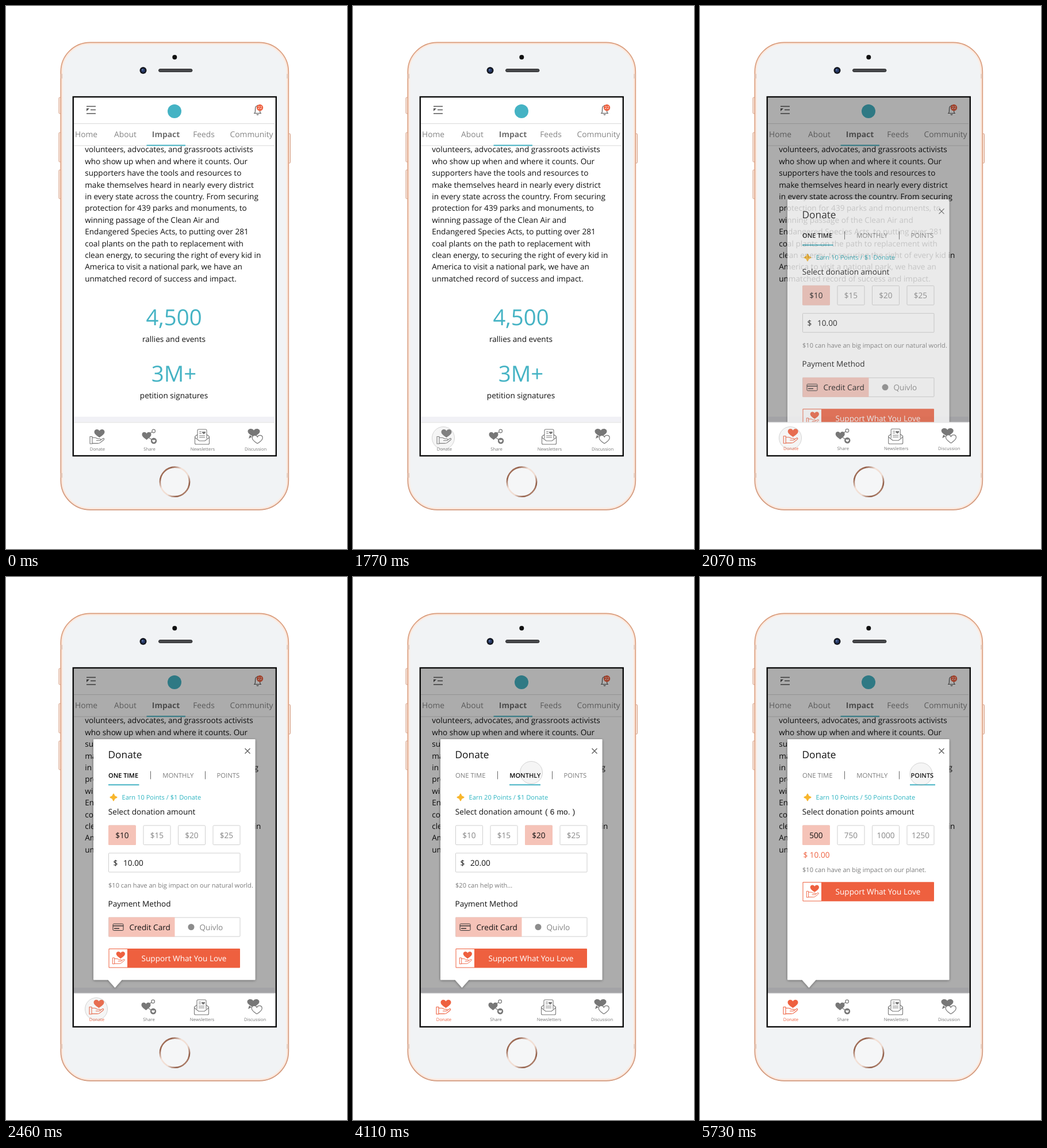
Animation of 593x944 px, one loop 5.76 s. Source, as an HTML page:

```html
<!DOCTYPE html>
<html lang="en">
<head>
<meta charset="utf-8">
<title>Donation app</title>
<style>
  html, body { margin: 0; width: 100%; height: 100%; overflow: hidden; background: #fff; }
  svg { display: block; width: 593px; height: 944px; font-family: "Open Sans", "Noto Sans", sans-serif; font-size: 13.6px; text-rendering: geometricPrecision; }
</style>
</head>
<body>
<svg id="stage" viewBox="0 0 593 944" xmlns="http://www.w3.org/2000/svg"></svg>
<script>
const LOOP = 5760, DURATION = 300;
const TEAL = '#45b3c4', ORANGE = '#ee603f', PINK = '#f5c3b8', GREY = '#7b7b7b', LINE = '#cfcfcf';
const OPEN = 1900, MONTHLY = 3400, POINTS = 4900;

const text = (x, y, str, attrs = '') => `<text x="${x}" y="${y}" ${attrs}>${str}</text>`;
const mid = (x, y, str, attrs = '') => text(x, y, str, `text-anchor="middle" ${attrs}`);
const rect = (x, y, w, h, attrs = '') => `<rect x="${x}" y="${y}" width="${w}" height="${h}" ${attrs}/>`;
const circle = (x, y, r, attrs = '') => `<circle cx="${x}" cy="${y}" r="${r}" ${attrs}/>`;
const path = (d, attrs = '') => `<path d="${d}" ${attrs}/>`;
const outline = (color, width = 1) => `fill="none" stroke="${color}" stroke-width="${width}"`;
const heart = (x, y, w, h, attrs = '') =>
  `<use href="#heart" transform="translate(${x} ${y}) scale(${w} ${h})" ${attrs}/>`;

const lerp = (a, b, p) => a + (b - a) * p;
const clamp = v => Math.min(1, Math.max(0, v));

// cubic-bezier(0, 0, .58, 1)
function easeOut(x) {
  let lo = 0, hi = 1;
  for (let i = 0; i < 24; i++) {
    const u = (lo + hi) / 2;
    if (u * u * (1.74 - 0.74 * u) < x) lo = u; else hi = u;
  }
  return lo * lo * (3 - 2 * lo);
}
const progress = (t, start) => easeOut(clamp((t - start) / DURATION));

const defs = `<defs>
  <linearGradient id="gold" x1="0" y1="0" x2="0" y2="1">
    <stop offset="0" stop-color="#d99c7c"/><stop offset=".5" stop-color="#dfa68a"/><stop offset="1" stop-color="#d2997d"/>
  </linearGradient>
  <linearGradient id="ring" x1="0" y1="0" x2="1" y2="1">
    <stop offset="0" stop-color="#c99a83"/><stop offset=".2" stop-color="#94604a"/><stop offset=".38" stop-color="#f4e2d9"/>
    <stop offset=".6" stop-color="#f0dcd1"/><stop offset=".78" stop-color="#8f5b45"/><stop offset="1" stop-color="#e2bfae"/>
  </linearGradient>
  <filter id="shadow" x="-10%" y="-10%" width="120%" height="120%">
    <feDropShadow dx="0" dy="1" stdDeviation="2" flood-color="#000" flood-opacity=".4"/>
  </filter>
  <clipPath id="page">${rect(117, 243.5, 352, 480)}</clipPath>
  <clipPath id="above">${rect(117, 158, 352, 566)}</clipPath>
  <path id="heart" vector-effect="non-scaling-stroke" d="M0 .95C-.35 .65-1 .2-1-.35C-1-.75-.76-.95-.5-.95C-.25-.95-.08-.8 0-.58C.08-.8 .25-.95 .5-.95C.76-.95 1-.75 1-.35C1 .2 .35 .65 0 .95Z"/>
  <g id="give">
    ${heart(4.5, -5.5, 9, 7.5, 'fill="currentColor"')}
    ${path('M-12 0h4v12.5h-4zM-8 2h5c2.5 0 3 2 5.5 2h2.5c2.2 0 2.2 3 0 3h-6M6.5 6l4-2.5c2-1 3 .8 1.5 2.2l-6.5 5.2c-1 .8-2 1-4 1h-9.5',
      'fill="none" stroke="currentColor" stroke-width="1.1" stroke-linejoin="round"')}
  </g>
</defs>`;

function phone() {
  const button = (x, y, h) => rect(x, y, 4, h, 'rx="1.3" fill="#fbeae0" stroke="#d39c82" stroke-width="1"');
  const bands = [[95.5, 118], [95.5, 812], [486.5, 118], [486.5, 812]]
    .map(([x, y]) => rect(x, y, 4.5, 8, 'fill="#e6cabb"')).join('');
  return button(92, 159, 28) + button(92, 220, 51) + button(92, 285, 50) + button(490.5, 222, 51)
    + rect(95.3, 63.3, 396, 812.5, 'rx="51" fill="#fbe6da" stroke="url(#gold)" stroke-width="1.7"')
    + bands
    + rect(99, 67, 388.5, 805, 'rx="47" fill="#f1f3f5" stroke="#f6f1ee" stroke-width="1.5"')
    + circle(293.3, 89, 4, 'fill="#111"')
    + circle(238.5, 112, 6, 'fill="#14171f"') + circle(238.5, 112, 3.4, 'fill="#273a68"') + circle(237.5, 111, 1.2, 'fill="#6d84b5"')
    + rect(265.5, 109.5, 58.5, 5, 'rx="2.5" fill="#47484b" stroke="#2e2e30" stroke-width="1"')
    + circle(293.5, 827.2, 25.6, 'fill="#f5f6f7" stroke="url(#ring)" stroke-width="2.6"')
    + rect(117, 158, 353, 624, 'fill="#fff"');
}

function page() {
  const copy = [
    'volunteers, advocates, and grassroots activists', 'who show up when and where it counts. Our',
    'supporters have the tools and resources to', 'make themselves heard in nearly every district',
    'in every state across the country. From securing', 'protection for 439 parks and monuments, to',
    'winning passage of the Clean Air and', 'Endangered Species Acts, to putting over 281',
    'coal plants on the path to replacement with', 'clean energy, to securing the right of every kid in',
    'America to visit a national park, we have an', 'unmatched record of success and impact.'
  ].map((line, i) => text(137.2, 254.3 + i * 20.4, line)).join('');
  const tabs = [['Home', 139.5], ['About', 207.5], ['Feeds', 344], ['Community', 427]]
    .map(([name, x]) => mid(x, 228, name)).join('');
  const bell = path('M431 186.5h13M432.5 186.5c1.3-2 1-4.5 1-7.5c0-3.5 1.8-5.5 4-5.5s4 2 4 5.5c0 3-.3 5.5 1 7.5M435.8 188.3q1.7 1.5 3.4 0M437.5 173.5v-1.5', outline('#555', 1.2));
  const stats = mid(292, 554.5, '4,500', `font-size="38.4" fill="${TEAL}"`) + mid(292, 584, 'rallies and events')
    + mid(292, 653, '3M+', `font-size="38.4" fill="${TEAL}"`) + mid(292, 682.3, 'petition signatures');
  return `<g clip-path="url(#page)" fill="#111">${copy}</g><g id="stats" fill="#111">${stats}</g>`
    + rect(118, 714, 349, 10, 'fill="#f1f1f6"')
    + path('M118 204.5H467M118 242.8H467', outline('#d9d9d9'))
    + path('M140 174.5h16M147 180.5h9M140 187h16', outline('#555', 1.5)) + path('M140 178h5l-5 5z', 'fill="#555"')
    + circle(293, 183, 12, `fill="${TEAL}"`)
    + bell + circle(441.5, 176.7, 5.7, `fill="${ORANGE}"`) + mid(441.5, 179.2, '22', 'font-size="7" fill="#fff"')
    + `<g font-size="13.8" fill="#858585">${tabs}${mid(278, 228, 'Impact', 'font-weight="700" fill="#707070"')}</g>`
    + rect(244.5, 241.3, 67.5, 2, `fill="${TEAL}"`);
}

function nav() {
  const g = '#777';
  const label = (x, name, attrs = '') => mid(x, 773, name, `font-size="7.7" ${attrs}`);
  const share = path('M249 744l5-3.5M249 751l4 2.5', outline(g, 1.2)) + heart(244.5, 747.5, 8, 7, `fill="${g}"`)
    + circle(256.7, 739, 2.8, outline(g, 1.2)) + circle(257, 756, 5.2, `fill="${g}"`) + heart(257, 756.5, 2.7, 2.3, 'fill="#fff"');
  const news = path('M333 745l-4.5 3.5v11.5q0 2 2 2h21q2 0 2-2v-11.5l-4.5-3.5M333 752v-14q0-2 2-2h12q2 0 2 2v14M328.500 750l7.500 6h10l7.500-6', outline(g, 1.1))
    + path('M336 740h4M336 743h4M336 747h10M336 750h10', outline(g)) + heart(344, 742, 3, 2.5, `fill="${g}"`);
  const talk = heart(431, 742, 10.5, 7.5, `fill="${g}"`) + path('M424 746l-2 6 6-3z', `fill="${g}"`)
    + heart(437.2, 753.5, 9, 7.5, `fill="#fff" stroke="${g}" stroke-width="1.2"`);
  return rect(117, 723.5, 352.5, 58, 'fill="#fff"') + path('M118 724H467', outline('#dcdcdc'))
    + `<g id="navItems" fill="${g}"><g id="donate"><use href="#give" x="158" y="748.5"/>${label(159, 'Donate', 'fill="currentColor"')}</g>
      ${share}${news}${talk}${label(249.5, 'Share')}${label(342, 'Newsletters')}${label(434, 'Discussion')}</g>`;
}

const underlines = [[178, 231.5], [272, 326], [365, 409]];
const screens = [
  { earn: 'Earn 10 Points / $1 Donate', title: 'Select donation amount', amounts: ['$10', '$15', '$20', '$25'],
    selected: 0, value: '10.00', note: '$10 can have an big impact on our natural world.', buttonY: 646 },
  { earn: 'Earn 20 Points / $1 Donate', title: 'Select donation amount', amounts: ['$10', '$15', '$20', '$25'],
    selected: 2, value: '20.00', note: '$20 can help with...', extra: '( 6 mo. )', buttonY: 646 },
  { earn: 'Earn 10 Points / 50 Points Donate', title: 'Select donation points amount', amounts: ['500', '750', '1000', '1250'],
    selected: 0, note: '$10 can have an big impact on our planet.', buttonY: 530.3 }
];

function tabRow(from, to, p) {
  const names = [['ONE TIME', 178], ['MONTHLY', 272.3], ['POINTS', 366.5]].map(([name, x], i) => {
    const on = i === to ? p : i === from ? 1 - p : 0;
    return text(x, 348.5, name, `font-size="11.3" fill="${GREY}" opacity="${1 - on}"`)
      + text(x, 348.5, name, `font-size="11" font-weight="600" fill="#000" opacity="${on}"`);
  }).join('');
  const [a, b] = underlines[from].map((x, i) => lerp(x, underlines[to][i], p));
  return names + path('M251.5 337.5v14M346.5 337.5v14', outline('#666')) + rect(a, 360.3, b - a, 2, `fill="${TEAL}"`);
}

function paymentFields(s) {
  return rect(178.5, 480, 228.5, 33, outline(LINE) + ' rx="1"') + text(186.5, 501.6, '$') + text(204, 501.6, s.value)
    + text(178, 539.8, s.note, `font-size="11.05" fill="${GREY}"`)
    + text(177.5, 572.8, 'Payment Method')
    + rect(178.5, 592, 228.5, 33, outline(LINE) + ' rx="1"') + rect(178.5, 591.5, 115, 34, `fill="${PINK}"`)
    + rect(186, 603, 18, 11.5, outline('#333') + ' rx="1.5"') + path('M186 606.5h18M188 611h9', outline('#333', 1.5))
    + text(214.5, 613.5, 'Credit Card')
    + circle(322, 608.5, 5.5, 'fill="#8c8c8c"') + text(336.5, 613.5, 'Quivlo', 'fill="#858585"');
}

function panel(from, to, p) {
  const s = screens[to];
  const amounts = s.amounts.map((label, i) => {
    const x = 178.5 + i * 60.5, on = i === s.selected;
    return rect(x, 432, 47, 33.5, `rx="1.5" fill="#fff" stroke="${LINE}"`)
      + (on ? rect(x - .5, 431.5, 48, 34.5, `rx="1.5" fill="${PINK}" opacity="${p}"`) : '')
      + mid(x + 23.5, 453.8, label, `fill="${on ? '#111' : '#858585'}"`);
  }).join('');
  const fields = s.value ? paymentFields(s)
    : text(179.5, 487.8, '$ 10.00', `fill="${ORANGE}"`) + text(178, 512.7, s.note, `font-size="11.05" fill="${GREY}"`);
  const y = lerp(screens[from].buttonY, s.buttonY, p);
  const support = rect(178.5, y, 228.5, 33.5, `rx="1" fill="${ORANGE}"`) + rect(179.5, y + 1, 31.5, 31.5, 'fill="#fff"')
    + `<use href="#give" color="${ORANGE}" transform="translate(195.5 ${y + 16}) scale(.85)"/>`
    + text(235.5, y + 21.8, 'Support What You Love', 'fill="#fff"');
  return path('M153 282H432.5q1 0 1 1V699.5q0 1-1 1H201.5L189.5 714L177.5 700.5H153q-1 0-1-1V283q0-1 1-1Z', 'fill="#fff" filter="url(#shadow)"')
    + text(177.5, 315, 'Donate', 'font-size="17.3"')
    + path('M415.5 298l9 9M424.5 298l-9 9', outline('#555', 1.1))
    + tabRow(from, to, p)
    + path('M187 377.5L188.8 381.2L192.5 383L188.8 384.8L187 388.5L185.2 384.8L181.5 383L185.2 381.2Z',
      'fill="#f8b62d" stroke="#f8b62d" stroke-width="2" stroke-linejoin="round"')
    + text(201.5, 387, s.earn, 'font-size="11.1" fill="#2fb5c2"')
    + text(177.8, 413.2, s.title)
    + (s.extra ? text(334, 413, s.extra, 'font-family="Liberation Sans, sans-serif" letter-spacing=".2"') : '')
    + amounts + fields + support;
}

const stage = document.getElementById('stage');
stage.innerHTML = defs + phone() + page()
  + rect(117, 158, 352.5, 566, 'id="dim" fill="#000" opacity=".325"')
  + '<g clip-path="url(#above)"><g id="popup" fill="#111"></g></g>'
  + nav()
  + rect(116.8, 158, 353, 624, outline('#0b0b0b', 2.4))
  + circle(0, 0, 19.5, 'id="touch" fill="#b4b4b4" fill-opacity=".14" stroke="#999" stroke-opacity=".4" stroke-width="1"');
const [stats, dim, popup, navItems, donate, touch] =
  ['stats', 'dim', 'popup', 'navItems', 'donate', 'touch'].map(id => document.getElementById(id));

const moves = [[1300, 157, 751], [2800, 310, 340], [4300, 384.5, 342.5]];
function touchPoint(t) {
  return moves.reduce(([x, y], [start, toX, toY]) => {
    const p = progress(t, start);
    return [lerp(x, toX, p), lerp(y, toY, p)];
  }, [173.8, 661]);
}

function draw(t) {
  const open = t >= OPEN, shown = progress(t, OPEN);
  dim.style.display = popup.style.display = open ? '' : 'none';
  stats.style.display = open ? 'none' : '';
  donate.setAttribute('color', open ? ORANGE : '#777');
  navItems.setAttribute('transform', `translate(${-shown} ${-shown})`);
  if (open) {
    popup.setAttribute('opacity', shown);
    popup.setAttribute('transform', `translate(0 ${223 * (1 - shown)})`);
    popup.innerHTML = t >= POINTS ? panel(1, 2, progress(t, POINTS))
      : t >= MONTHLY ? panel(0, 1, progress(t, MONTHLY)) : panel(0, 0, 1);
  }
  const [x, y] = touchPoint(t);
  touch.setAttribute('transform', `translate(${x} ${y})`);
  touch.setAttribute('opacity', progress(t, 200));
}

const begin = performance.now();
function tick() {
  draw((performance.now() - begin) % LOOP);
  requestAnimationFrame(tick);
}
tick();
</script>
</body>
</html>
```
